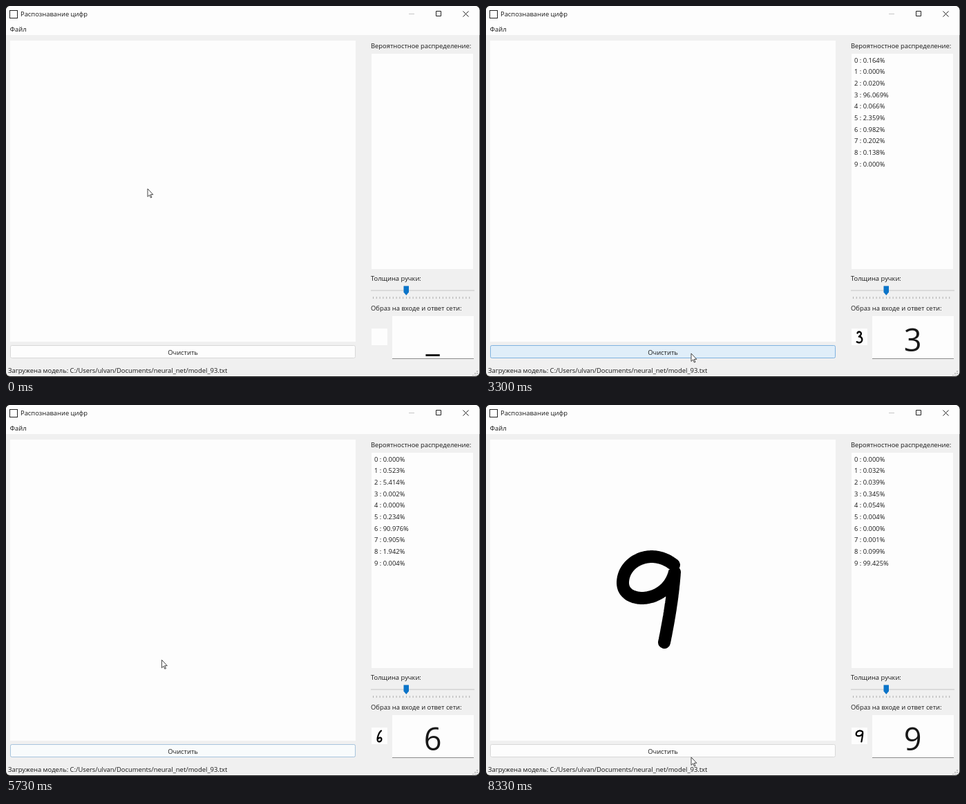
Write an HTML page that moves like this. It is 686 px wide and 536 px high and loops after 8.36 s.

```html
<!DOCTYPE html>
<html lang="ru">
<head>
<meta charset="utf-8">
<title>Распознавание цифр</title>
<style>
html, body { margin: 0; width: 100%; height: 100%; overflow: hidden; background: #1a1a1a; }
svg { display: block; font: 9.4px "Open Sans", "Noto Sans", sans-serif; fill: #181818; }
.panel { fill: #fdfdfd; }
.line { fill: none; stroke: #222; }
.ink { fill: none; stroke: #000; stroke-width: 18; stroke-linecap: round; stroke-linejoin: round; }
</style>
</head>
<body>
<svg width="686" height="536" viewBox="0 0 686 536">
  <clipPath id="frame"><rect width="685.3" height="535" rx="6"/></clipPath>
  <g clip-path="url(#frame)">
    <rect width="686" height="536" fill="#f0f0f0"/>
    <rect class="panel" width="686" height="42"/>
  </g>

  <rect class="line" x="5.5" y="6.5" width="11" height="11"/>
  <text x="21" y="15">Распознавание цифр</text>
  <text x="5.5" y="36.5">Файл</text>
  <path class="line" d="M583 11.5h8" stroke-opacity=".25"/>
  <path class="line" d="M622.5 7.5h7v7h-7zM661.5 7.5l8 8m0-8l-8 8"/>

  <rect class="panel" x="6" y="50" width="500" height="435"/>
  <rect class="panel" x="529" y="69" width="147" height="311"/>
  <rect class="panel" x="529" y="466" width="23" height="24"/>
  <rect class="panel" x="559" y="448" width="118" height="61"/>
  <path d="M559 509.5h118" stroke="#8c8c8c"/>

  <text x="528" y="60.5">Вероятностное распределение:</text>
  <text x="528" y="397">Толщина ручки:</text>
  <text x="528" y="440">Образ на входе и ответ сети:</text>
  <text x="3" y="530">Загружена модель: C:/Users/ulvan/Documents/neural_net/model_93.txt</text>

  <rect x="528" y="410" width="150" height="2" fill="#dadada"/>
  <path d="M531 421.5h144" stroke="#b0b0b0" stroke-width="3" stroke-dasharray="1 3.8"/>
  <path d="M575.5 404.5h7.5v9l-3.75 4.5l-3.75-4.5z" fill="#0b74c8"/>
  <path d="M682 527v7M679 530v4M676 533v1" stroke="#b4b4b4" stroke-width="2" stroke-dasharray="1.6 1.4"/>

  <rect class="panel" x="6.5" y="490.5" width="499" height="18" rx="2" stroke="#d8d8d8"/>
  <rect id="glow" x="6.5" y="490.5" width="499" height="18" rx="2" fill="#e0eef9"/>
  <rect id="edge" x="6.5" y="490.5" width="499" height="18" rx="2" fill="none" stroke="#7fb2e0"/>
  <text x="256" y="503.5" text-anchor="middle">Очистить</text>

  <g id="rows"></g>
  <text id="answer" x="617.5" y="498.5" font-size="45" text-anchor="middle"></text>
  <path id="ink" class="ink"/>
  <path id="thumb" class="ink"/>
  <path id="cursor" d="M0 0V11.5L2.6 9L4.4 13L6 12.3L4.2 8.4H7.8Z" fill="#fff" stroke="#333" stroke-width=".9"/>
</svg>
<script>
let LOOP = 8360, LAG = 17;
let $ = id => document.getElementById(id);

// Pen path of each digit, 0 to 9
let shapes = [
  'M224 208C172 212 174 334 220 334S270 214 224 208',
  'M202 253L222 216Q206 270 204 318L188 320L238 319',
  'M209 231C213 213 234 205 247 206C249 222 240 244 230 256L187 298Q215 293 249 297',
  'M198 222C206 190 270 218 214 260C270 260 250 350 192 316',
  'M206 210L196 268L246 262M252 212L243 334',
  'M245 200L208 204L202 256C262 236 266 350 194 320',
  'M240 206C206 228 174 334 216 334S250 250 196 306',
  'M196 240L254 236Q232 290 218 350',
  'M210 283L246 225C250 196 189 204 189 238C189 275 232 290 234 336C180 350 186 312 203 297L210 284',
  'M272 231C240 205 198 225 198 257S262 288 273 241Q270 285 258 343'
];

// When each drawing is cleared; the steps of a round are fixed shares of its span
let clears = [690, 1640, 2600, 3300, 3982, 4760, 5622, 6600, 7590, 8400];
let DOWN = .22, UP = .75, ARRIVE = .91, SETTLE = .965;
let start = [205, 264], below = [297, 509], button = [297, 502];

// Winning percentage and closest rival of each digit
let best = [97.214, 98.288, 78.366, 96.069, 97.852, 94.527, 90.976, 98.143, 95.851, 99.425];
let rival = [6, 3, 1, 5, 9, 3, 2, 1, 5, 3];

let rand = n => { let v = Math.sin(n * 12.9898 + 4.1) * 43758.5453; return v - Math.floor(v); };
let clamp = v => Math.max(0, Math.min(1, v));
let ease = v => (1 - Math.cos(Math.PI * clamp(v))) / 2;
let mix = (a, b, k) => a + (b - a) * k;

function glide(a, b, k, bow = 0) {
  k = ease(k);
  return [mix(a[0], b[0], k) - bow * Math.sin(Math.PI * k), mix(a[1], b[1], k)];
}

// Ten seeded shares that add up to 1
function shares(seed, skip = []) {
  let w = Array.from({length: 10}, (_, k) => skip.includes(k) ? 0 : rand(seed * 10 + k) ** 6);
  let sum = w.reduce((a, b) => a + b);
  return w.map(v => v / sum);
}

function odds(i, p) {
  let rest = 100 - best[i], others = shares(i + 50, [i, rival[i]]);
  let noise = shares(i * 20 + Math.floor(p * 14) + 7);
  return others.map((v, n) => {
    let end = n == i ? best[i] : rest * (n == rival[i] ? .6 : .4 * v);
    return mix(noise[n] * 100, end, clamp(p / .72));
  });
}

function svgNode(name, attrs) {
  let node = document.createElementNS('http://www.w3.org/2000/svg', name);
  for (let key in attrs) node.setAttribute(key, attrs[key]);
  return node;
}

function set(id, attrs) {
  for (let key in attrs) $(id).setAttribute(key, attrs[key]);
}

let pens = shapes.map(d => {
  let path = svgNode('path', {d}), size = path.getTotalLength();
  return p => { let q = path.getPointAtLength(size * p); return [q.x, q.y]; };
});

function trace(i, p) {
  return Array.from({length: Math.ceil(p * 140) + 1}, (_, n) => pens[i](Math.min(n / 140, p)));
}

function toPath(pts) {
  return pts.map((q, n) => {
    let jump = !n || Math.hypot(q[0] - pts[n - 1][0], q[1] - pts[n - 1][1]) > 12;
    return (jump ? 'M' : 'L') + q.map(v => v.toFixed(1));
  }).join('');
}

// Scale the drawing into the small preview
function fit(pts) {
  let range = k => { let v = pts.map(q => q[k]); return [Math.min(...v), Math.max(...v)]; };
  let [l, r] = range(0), [t, b] = range(1);
  let s = 18 / (Math.max(r - l, b - t) + 18);
  return `translate(540.5 478.5) scale(${s}) translate(${-(l + r) / 2} ${-(t + b) / 2})`;
}

let rows = Array.from({length: 10}, (_, k) =>
  $('rows').appendChild(svgNode('text', {x: 533, y: 81.7 + k * 16.67})));

function draw() {
  let t = performance.now() % LOOP;
  let i = clears.findIndex(end => t < end);
  let since = i ? clears[i - 1] : 0, span = clears[i] - since;
  let u = (t - since) / span;
  let p = clamp((u - DOWN) / (UP - DOWN));
  let inked = clamp((u - LAG / span - DOWN) / (UP - DOWN));

  let pos = u < DOWN ? glide(i ? button : start, pens[i](0), u / DOWN, 20)
    : u < UP ? pens[i](p)
    : u < ARRIVE ? glide(pens[i](1), below, (u - UP) / (ARRIVE - UP))
    : glide(below, button, (u - ARRIVE) / (SETTLE - ARRIVE));
  set('cursor', {transform: `translate(${pos})`});

  // The button's highlight fades after the cursor has left
  let over = pos[1] > 490 && pos[1] < 508;
  let fade = (hold, time) => over ? 1 : i ? clamp(1 - (t - since - hold) / time) : 0;
  set('glow', {opacity: fade(88, 25)});
  set('edge', {opacity: fade(88, 45)});

  // The last result stays until the next stroke begins
  let shown = inked > 0 ? i : i - 1, part = inked || 1;
  let pts = shown < 0 ? [] : trace(shown, part), d = toPath(pts);
  set('ink', {d: inked > 0 ? d : ''});
  set('thumb', {d, transform: pts.length ? fit(pts) : ''});

  let list = shown < 0 ? [] : odds(shown, part);
  rows.forEach((row, k) => row.textContent = list.length ? `${k} : ${list[k].toFixed(3)}%` : '');
  $('answer').textContent = list.length ? list.indexOf(Math.max(...list)) : '_';
  requestAnimationFrame(draw);
}
draw();
</script>
</body>
</html>
```
